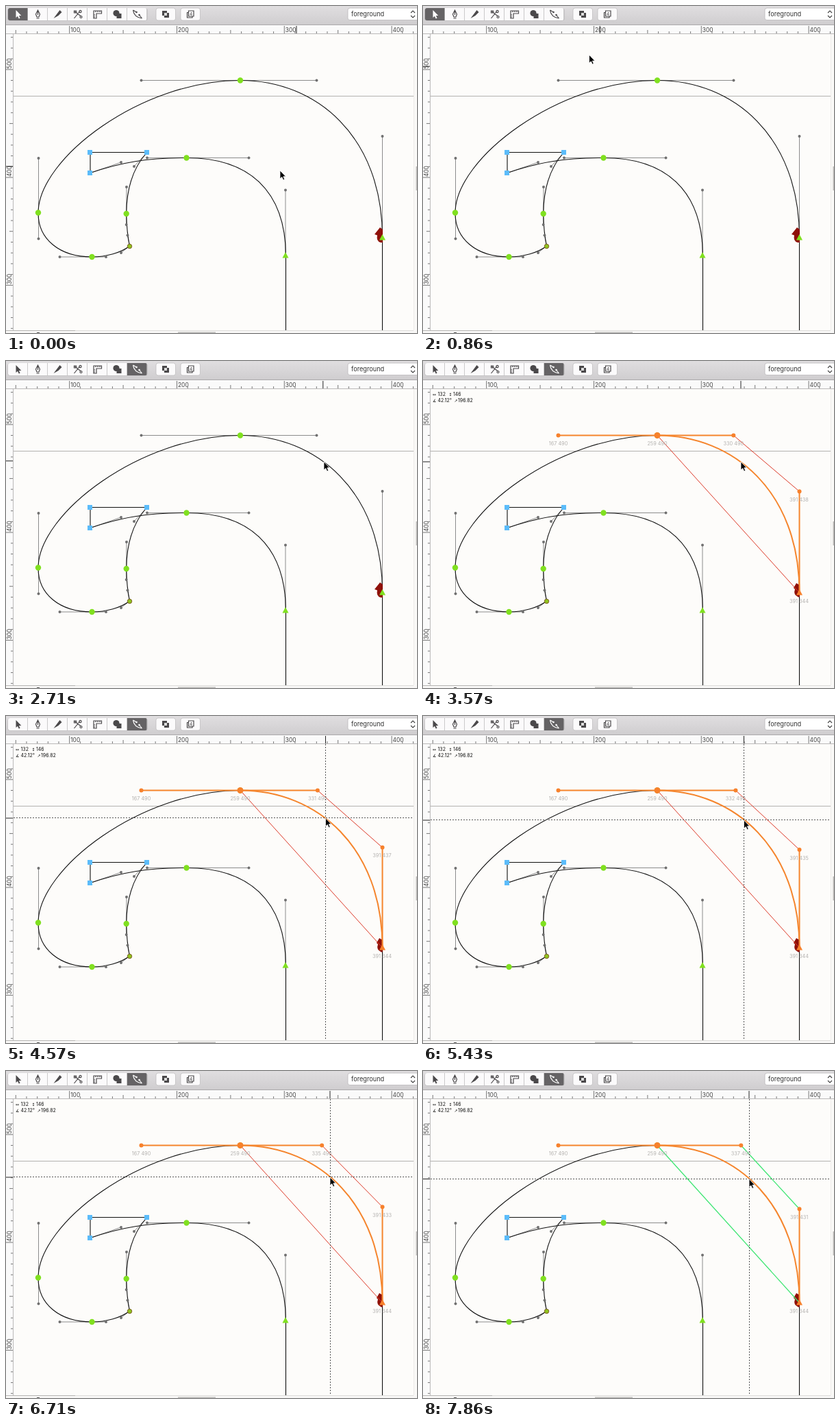
Write an HTML page that moves like this. It is 600x477 px and loops after 8000 ms.

```html
<!DOCTYPE html>
<html lang="en">
<head>
<meta charset="utf-8">
<title>Curve editor</title>
<style>
html, body { margin: 0; width: 100%; height: 100%; overflow: hidden; background: #fdfcfa; }
svg { display: block; width: 600px; height: 477px; font-family: Inter, "Liberation Sans", sans-serif; }
.line { fill: none; stroke: #111; stroke-width: 1.1; }
.arm { fill: none; stroke: #8c8c8c; stroke-width: 1; }
.knob { fill: #707070; }
.node { fill: #80e01f; }
.corner { fill: #5cbcfa; }
.tick { stroke: #777; stroke-width: 1; }
.num { font-size: 8.4px; fill: #444; }
.hot { fill: none; stroke: #f5852d; stroke-width: 2; }
.dot { fill: #f7812c; }
.coord { font-size: 7.3px; fill: #b4b2b0; text-anchor: middle; }
.info { font-size: 7px; fill: #111; }
.sym { font: 6px "DejaVu Sans", sans-serif; }
.cross { fill: none; stroke: #555; stroke-width: 1; stroke-dasharray: 2 2; }
.cage { fill: none; stroke: #dc3a28; stroke-width: 1; }
.cage.even { stroke: #3fe673; stroke-width: 1.3; }
.btn { fill: #fbfafb; }
.tool { color: #4a484a; }
.tool.on { color: #fff; }
.tool.on .btn { fill: #656365; }
.ink { fill: none; stroke: currentColor; stroke-width: 1.2; }
.solid { fill: currentColor; }
</style>
</head>
<body>
<svg viewBox="0 0 600 477">
  <defs>
    <linearGradient id="bar" x2="0" y2="1"><stop stop-color="#e0dee0"/><stop offset="1" stop-color="#cfcdcf"/></linearGradient>
    <clipPath id="group"><rect x="3" y="3" width="203" height="18" rx="3"/></clipPath>
    <clipPath id="paper"><rect x="11" y="41" width="584" height="432"/></clipPath>
  </defs>
  <rect width="600" height="477" fill="#fdfcfa"/>

  <g clip-path="url(#paper)">
    <path d="M11 131.5H595" stroke="#b3b2b0"/>
    <g id="arms"></g>
    <path class="line" d="M342 108.5C198 108.5 47 222 47 302C47 340 78 366 125.500 366C146 366 168 360 180.500 350C177 334 176 319 175.700 303C176 264 187 234 206 213.500H123V243.500C168 228 206 221.500 263.500 221.500C354.500 221.500 408 269 408.500 364V473M549.500 473V338"/>
    <path class="line" id="arc"/>
    <g id="knobs"></g>
    <g id="nodes"></g>
    <circle cx="180.500" cy="350.500" r="3.200" fill="#8fc51f" stroke="#7d5a1e"/>
    <path id="start" fill="#8f1009"/>
    <path class="node" d="M408 359L412.500 367.500H403.500Z"/>
    <path id="join" class="node" d="M549.500 333L554 341.500H545Z"/>

    <g id="picked">
      <path class="hot" d="M197.500 108.500H342"/>
      <path class="hot" id="levers"/>
      <path class="cage" id="cage"/>
      <circle class="dot" cx="197.500" cy="108.500" r="3"/>
      <circle class="dot" cx="342" cy="108.500" r="4.500"/>
      <circle class="dot" id="dotA" cy="108.500" r="3"/>
      <circle class="dot" id="dotB" cx="549.500" r="3"/>
      <path class="dot" d="M549.500 333L554 341.500H545Z"/>
      <text class="coord" x="197.500" y="122.500">167 490</text>
      <text class="coord" x="342" y="122.500">259 490</text>
      <text class="coord" id="textA" y="122.500"></text>
      <text class="coord" id="textB" x="549"></text>
      <text class="coord" x="549" y="352.500">391 344</text>
      <g class="info">
        <text class="sym" x="14" y="51">↔</text><text x="21.500" y="51">132</text>
        <text class="sym" x="37.500" y="51">↕</text><text x="44" y="51">146</text>
        <text class="sym" x="14" y="59.500">∡</text><text x="21.500" y="59.500">42.12°</text>
        <text class="sym" x="45.500" y="59.500">↗</text><text x="51" y="59.500">196.82</text>
      </g>
    </g>
    <path class="cross" id="cross"/>
  </g>

  <rect y="473" width="600" height="4" fill="#f8f7f6"/>
  <path d="M11 473.500H595" stroke="#dddcda"/>
  <path d="M0 473.500H101" stroke="#b5b4b2"/>
  <path d="M45 476.500H49" stroke="#555"/>
  <path d="M251 476.500H306" stroke="#bdbcba" stroke-width="2"/>
  <rect x="595" y="41" width="5" height="432" fill="#faf9f7"/>
  <path d="M595.500 41V473" stroke="#eceae8"/>
  <path d="M599.500 234V269" stroke="#bdbcba" stroke-width="2"/>

  <rect y="28" width="600" height="13" fill="#fafafa"/>
  <rect y="41" width="11" height="432" fill="#fafafa"/>
  <path d="M0 40.500H600M10.500 41V473" stroke="#bbb9b9" fill="none"/>
  <g id="rulers"></g>
  <path id="marks" stroke="#222" fill="none"/>

  <rect width="600" height="27.500" fill="url(#bar)"/>
  <path d="M0 27.500H600" stroke="#aaa8aa"/>
  <rect x="2.500" y="3" width="204" height="18.500" rx="3.500" fill="#b5b3b5"/>
  <g id="tools" clip-path="url(#group)"></g>
  <g id="extras" color="#4a484a">
    <rect x="219" y="3" width="28.500" height="18" rx="3" fill="#fbfafb" stroke="#bbb9bb" stroke-width=".7"/>
    <path class="solid" d="M228 7H235V10H238V17H231V14H228Z"/>
    <rect x="231" y="10" width="4" height="4" fill="#ddd"/>
    <rect x="255" y="3" width="28.500" height="18" rx="3" fill="#fbfafb" stroke="#bbb9bb" stroke-width=".7"/>
    <path class="ink" d="M266.500 9.500H264.500V17H272V15M266.500 7H274V15H266.500Z" stroke-width=".9"/>
    <text x="270.200" y="13.500" font-size="6.500" text-anchor="middle" class="solid">4</text>
  </g>
  <rect x="499" y="3" width="106" height="17.500" rx="3" fill="#fff" stroke="#bab8ba" stroke-width=".8"/>
  <text x="504" y="15" font-size="9.200" fill="#333">foreground</text>
  <path class="ink" color="#444" d="M591 10L594 7L597 10M591 14L594 17L597 14"/>

  <path id="cursor" d="M0 0V12L2.800 9.500L4.700 13.800L6.700 13L4.900 8.800H8.500Z" fill="#000" stroke="#fff" stroke-width=".8"/>
</svg>
<script>
const $ = id => document.getElementById(id);
const set = (id, attrs) => { for (const k in attrs) $(id).setAttribute(k, attrs[k]); };
const gx = u => 342 + (u - 259) * 1.568;
const gy = v => 108.5 + (490 - v) * 1.573;

// handles as [node x, node y, handle x, handle y]
const fixedArms = [
  [342, 108.5, 197.5, 108.5], [47.5, 302, 47.5, 222], [47.5, 302, 47.5, 339.5],
  [125.5, 366, 78.5, 366], [125.5, 366, 146, 366], [180.5, 350, 168, 360], [180.5, 350, 177.5, 334.5],
  [175.7, 303, 176, 264], [175.7, 303, 175.7, 319], [206, 213.5, 187, 234],
  [123, 243.5, 168, 228], [263.5, 221.5, 206, 221.5], [263.5, 221.5, 354.5, 221.5], [408, 364, 408, 268.5]
];
const looseArms = [[342, 108.5, 453.5, 108.5], [549.5, 338, 549.5, 190]];
const armLine = ([a, b, c, d]) => `<path class="arm" d="M${a} ${b}L${c} ${d}"/>`;
const knob = ([, , c, d]) => `<circle class="knob" cx="${c}" cy="${d}" r="2"/>`;
const loose = f => `<g class="loose">${looseArms.map(f).join('')}</g>`;
$('arms').innerHTML = fixedArms.map(armLine).join('') + loose(armLine);
$('knobs').innerHTML = fixedArms.map(knob).join('') + loose(knob);
$('nodes').innerHTML =
  [[342, 108.5], [47, 301.5], [125.5, 366], [175.7, 303], [263.5, 221.5]]
    .map(([x, y]) => `<circle class="node" cx="${x}" cy="${y}" r="4.2"/>`).join('') +
  [[122.5, 213.5], [205.5, 213.5], [122.5, 243.5]]
    .map(([x, y]) => `<rect class="corner" x="${x - 3.5}" y="${y - 3.5}" width="7" height="7"/>`).join('');

let ruler = '';
for (let k = 50; k <= 530; k += 10) {
  const x = gx(k), y = gy(k), big = k % 100 === 0, len = big ? 11 : k % 50 ? 3 : 5;
  if (x > 11 && x < 600) {
    ruler += `<path class="tick" d="M${x} 40V${40 - len}"/>`;
    if (big) ruler += `<text class="num" x="${x + 1.5}" y="37.5">${k}</text>`;
  }
  if (y > 42 && y < 473) {
    ruler += `<path class="tick" d="M10 ${y}H${10 - Math.min(len, 10)}"/>`;
    if (big) ruler += `<text class="num" transform="translate(7.5 ${y - 1}) rotate(-90)">${k}</text>`;
  }
}
$('rulers').innerHTML = ruler;

// icons are centred on 0,0
const icons = [
  '<path class="solid" d="M-3 -6V5L-.5 2.800L1.300 6.500L3 5.700L1.400 2H4.800Z"/>',
  '<path class="ink" d="M0 -6L-3 0L-1.500 4H1.500L3 0ZM0 -5V1M-2 6H2"/>',
  '<path class="solid" d="M-6 6L3 -6L6 -3L1 2Z"/>',
  '<path class="ink" d="M-5 6L3 -4M-4 -4L5 3M-5 -5H-2V-2H-5Z"/><circle class="ink" cx="4" cy="-4" r="1.600"/><circle class="ink" cx="5" cy="4" r="1.500"/>',
  '<path class="ink" d="M-5.500 -5H6V-1H-1.500V6H-5.500ZM-2.500 -5V-3M.5 -5V-3M3.500 -5V-3M-5.500 1H-3.500M-5.500 4H-3.500"/>',
  '<circle class="solid" cx="-1.500" cy="-1.500" r="4.600"/><path class="solid" d="M-1 -1H6V6H-1Z"/>',
  '<path class="ink" d="M-6 -6C-5 2 0 5 7 6M-6 -6L-1 -3M7 6L3 1" stroke-width=".9"/><circle class="solid" cx="-1" cy="-3" r="1.300"/><circle class="solid" cx="3" cy="1" r="1.300"/>'
];
$('tools').innerHTML = icons.map((icon, i) => {
  const x = 3 + i * 29;
  return `<g class="tool"><rect class="btn" x="${x}" y="3" width="28.300" height="18"/><g transform="translate(${x + 14.5} 12)">${icon}</g></g>`;
}).join('');
const tools = document.querySelectorAll('.tool');

// keys: [step, a, b], seven steps a second
const pointer = [[-1, 440, 230], [0, 400, 240], [8, 190, 15], [10, 190, 15], [11, 241, 32],
  [18, 462, 145], [19, 464, 147], [25, 464, 147], [32, 466.5, 149], [38, 468.5, 152], [47, 473, 155], [55, 476, 157.5]];
const grips = [[25, 330, 438], [32, 331, 437], [38, 332, 435], [47, 335, 433], [55, 337, 431]];

function at(keys, n) {
  const i = keys.findIndex(k => k[0] >= n);
  if (i <= 0) return keys[0].slice(1);
  const [p, q] = [keys[i - 1], keys[i]], f = (n - p[0]) / (q[0] - p[0]);
  return [1, 2].map(j => p[j] + (q[j] - p[j]) * f);
}
const show = (el, on) => { el.style.display = on ? '' : 'none'; };

function draw(n) {
  const [x, y] = at(pointer, n), [mx, my] = at(pointer, n - (n < 25 ? 0.6 : 0));
  const [u, v] = at(grips, n).map(Math.round);
  const ax = gx(u), by = gy(v), picked = n >= 21;

  set('cursor', { transform: `translate(${x} ${y})` });
  set('marks', { d: `M${mx} 29V40` + (my > 41 ? `M0 ${my}H10` : '') });
  tools[0].classList.toggle('on', n < 11);
  tools[6].classList.toggle('on', n >= 9);

  const arc = `M342 108.5C${ax} 108.5 549.5 ${by} 549.5 338`;
  set('arc', { d: arc, class: picked ? 'hot' : 'line' });
  set('levers', { d: `M342 108.5H${ax}M549.5 338V${by}` });
  set('cage', { d: `M342 108.5L549.5 338M${ax} 108.5L549.5 ${by}`, class: v <= 431 ? 'cage even' : 'cage' });
  set('dotA', { cx: ax });
  set('dotB', { cy: by });
  set('textA', { x: ax });
  set('textB', { y: by + 14.5 });
  $('textA').textContent = u + ' 490';
  $('textB').textContent = '391 ' + v;
  set('start', { d: picked
    ? 'M545 324L541 331L543 333Q540 341 548 344.500L550 344V327Z'
    : 'M546 323L538 333L542 334.500Q540 343 547 345H550V326Z' });
  set('cross', { d: `M11 ${Math.round(y) - .5}H595M${Math.floor(x) + .5} 41V473` });
  show($('picked'), picked);
  show($('join'), !picked);
  show($('cross'), picked && n !== 25);
  document.querySelectorAll('.loose').forEach(el => show(el, !picked));
}

const t0 = performance.now();
function tick() {
  const t = (performance.now() - t0) % 8000;
  draw(Math.floor((t + 6) * 7 / 1000) % 56);
  requestAnimationFrame(tick);
}
tick();
</script>
</body>
</html>
```
